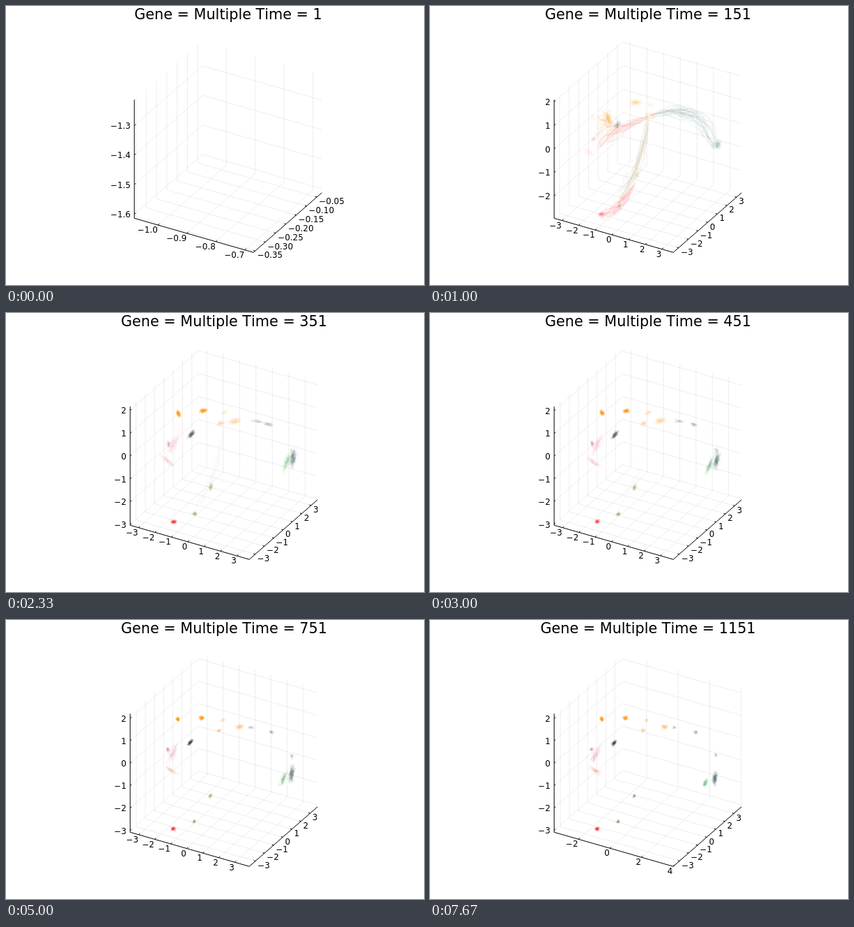
Write an HTML page with a canvas that moves like this. It is 600 by 400 pixels and loops after 8 s.

```html
<!DOCTYPE html>
<html lang="en">
<head>
<meta charset="utf-8">
<title>Gene trajectories</title>
<style>
  html, body { margin: 0; width: 100%; height: 100%; overflow: hidden; background: #fff; }
  svg, canvas { position: absolute; left: 0; top: 0; width: 600px; height: 400px; }
  text { font-family: "DejaVu Sans", sans-serif; font-size: 11.9px; font-kerning: none; fill: #000; }
  .title { font-size: 20.75px; text-anchor: middle; }
  .end { text-anchor: end; }
  .grid { stroke: #000; stroke-opacity: .07; fill: none; }
  .axis { stroke: #000; fill: none; }
</style>
</head>
<body>
<svg id="plot" viewBox="0 0 600 400"></svg>
<canvas id="cells" width="600" height="400"></canvas>
<script>
const LOOP = 8000, STEPS = 24;
const plot = document.getElementById('plot');
const ctx = document.getElementById('cells').getContext('2d');

const mix = (a, b, k) => a + (b - a) * k;
const decay = (step, start, tau) => Math.exp(-Math.max(0, step - start) / tau);

function rng(seed) {
  return () => {
    seed = seed + 0x6D2B79F5 | 0;
    let r = Math.imul(seed ^ seed >>> 15, 1 | seed);
    r = r + Math.imul(r ^ r >>> 7, 61 | r) ^ r;
    return ((r ^ r >>> 14) >>> 0) / 4294967296;
  };
}
const gauss = rnd => (rnd() + rnd() + rnd() - 1.5) * 2;

// ---------- axes ----------
// Screen vectors of the three box edges
const EX = [171, 49], EY = [98, -85.5], EZ = [0, -170];

// Axis ranges: one point at first, then the box widens as the cells spread
function ranges(step) {
  if (step === 0) return { x: [-1.082, -.67], y: [-.358, -.026], z: [-1.614, -1.2125] };
  const k = Math.exp((3 - step) / 5);
  return {
    x: [-3.54 + .07 * k, Math.min(4.02, 3.68 + .019 * (step - 3))],
    y: [-3.69 + .13 * k, 3.85 - .33 * k],
    z: [-3.09 + .14 * k, 2.22 - .13 * k]
  };
}

// Pairs of value and position along the axis
function ticks([lo, hi], unit) {
  const out = [];
  for (let i = Math.ceil(lo / unit); i * unit <= hi; i++) out.push([i * unit, (i * unit - lo) / (hi - lo)]);
  return out;
}

function drawAxes(step) {
  const first = step === 0, ox = first ? 184.2 : 178.2, oy = 304.3;
  const { x, y, z } = ranges(step);
  const at = (a, b, c) => [
    ox + a * EX[0] + b * EY[0] + c * EZ[0],
    oy + a * EX[1] + b * EY[1] + c * EZ[1]
  ];
  const path = (...pts) => 'M' + pts.map(p => p.map(n => n.toFixed(2)).join(' ')).join('L');
  let grid = '', texts = '';
  let axis = path(at(0, 0, 1), at(0, 0, 0), at(1, 0, 0), at(1, 1, 0));
  const put = (px, py, s, cls) => {
    texts += `<text x="${px.toFixed(2)}" y="${py.toFixed(2)}" class="${cls}">${s}</text>`;
  };
  const number = (v, digits) => (v < -1e-9 ? '\u2212' : '') + Math.abs(v).toFixed(first ? digits : 0);

  for (const [v, f] of ticks(x, first ? .1 : x[1] > 4 ? 2 : 1)) {
    const p = at(f, 0, 0);
    grid += path(p, at(f, 1, 0), at(f, 1, 1));
    axis += path(p, at(f, .02, 0));
    put(p[0] - .5, p[1] + 11.2, number(v, 1), 'end');
  }
  for (const [v, f] of ticks(y, first ? .05 : 1)) {
    const p = at(1, f, 0);
    grid += path(p, at(0, f, 0), at(0, f, 1));
    axis += path(p, at(.986, f, 0));
    put(p[0] + 3.2, p[1] + 10.2, number(v, 2), '');
  }
  for (const [v, f] of ticks(z, first ? .1 : 1)) {
    const p = at(0, 0, f);
    grid += path(p, at(0, 1, f), at(1, 1, f));
    axis += path(p, at(0, .02, f));
    put(ox - 5.4, p[1] + 4.8, number(v, 1), 'end');
  }
  put(ox + 134.8, 18.6, 'Gene = Multiple Time = ' + (1 + 50 * step), 'title');
  plot.innerHTML = `<path class="grid" d="${grid}"/><path class="axis" d="${axis}"/>` + texts;
}

// ---------- cells ----------
const items = [];

// Bundle of wandering strands along a curve; fades with time constant tau
function stream(color, n, width, tau, ...pts) {
  items.push((step, rnd) => {
    const life = decay(step, 3, tau), reach = Math.min(1, step * .45);
    if (life < .12) return;
    ctx.strokeStyle = color;
    ctx.globalAlpha = .15 * life;
    for (let i = 0; i < n; i++) {
      const from = rnd() * mix(.7, .3, life) * reach, to = reach * (1 - rnd() * .3);
      const count = Math.ceil((to - from) * 24) + 2;
      const side = [gauss(rnd), gauss(rnd)];
      ctx.beginPath();
      for (let j = 0; j <= count; j++) {
        const u = mix(from, to, j / count), [x, y] = along(pts, u);
        const w = width * mix(.5, 1, life) * (.25 + Math.sin(Math.PI * .85 * u ** 1.3));
        side.forEach((v, c) => { side[c] = v * .94 + gauss(rnd) * .3; });
        ctx.lineTo(x + side[0] * w, y + side[1] * w);
      }
      ctx.stroke();
    }
  });
}

// Scribbled swarm that drifts from a to b, drawn out on the way; long is its final length to width
function swarm(color, n, a, b, size, tau, long = 1.2) {
  const dx = b[0] - a[0], dy = b[1] - a[1], dist = Math.hypot(dx, dy);
  const c = dx / dist, s = dy / dist;
  items.push((step, rnd) => {
    if (step < 3) return;
    const k = decay(step, 2, tau);
    const x = mix(b[0], a[0], k), y = mix(b[1], a[1], k);
    const sx = size * long + dist * k * (1 - k) * .5, sy = size * (1 + .8 * k);
    ctx.strokeStyle = color;
    ctx.globalAlpha = .12 * (1 - .5 * k) * Math.min(1, (step - 1) / 4);
    for (let i = 0; i < n; i++) {
      ctx.beginPath();
      for (let j = 0; j < 8; j++) {
        const p = gauss(rnd) * sx, q = gauss(rnd) * sy;
        ctx.lineTo(x + p * c - q * s, y + p * s + q * c);
      }
      ctx.stroke();
    }
  });
}

// Point on a Catmull-Rom curve, u in 0..1
function along(pts, u) {
  const last = pts.length - 1, t = Math.min(u * last, last - 1e-6), i = Math.floor(t), k = t - i;
  const p = j => pts[Math.max(0, Math.min(last, j))];
  return [0, 1].map(c => {
    const a = p(i - 1)[c], b = p(i)[c], d = p(i + 1)[c], e = p(i + 2)[c];
    return b + .5 * k * (d - a + k * (2 * a - 5 * b + 4 * d - e + k * (3 * (b - d) + e - a)));
  });
}

const ORANGE = '#ff9d1c', PEACH = '#ffb568', GREY = '#8c9494', SLATE = '#6f8585';
const FORK = [314, 158];

stream('#b5a27c', 26, 4, 3, FORK, [298, 228], [267, 291]);
stream('#ff5a5a', 26, 4, 1.5, [296, 252], [272, 283], [243, 301]);
stream('#e2605a', 24, 4, 1.2, FORK, [275, 176], [237, 204]);
stream(SLATE, 30, 4.5, 1.8, FORK, [352, 151], [388, 163], [410, 205]);
stream('#eeb070', 22, 7, 2, [274, 178], [254, 168], [242, 160]);

swarm(ORANGE, 34, [303, 137], [280.5, 140.5], 1.6, 2.5);
swarm(ORANGE, 34, [262, 172], [246.5, 142], 1.5, 2);
swarm(PEACH, 18, [314, 159], [337, 153], 2, 5);
swarm(PEACH, 12, [312, 157], [305.5, 158.5], 1.6, 5);
swarm(PEACH, 7, [318, 141], [310.5, 144], 1.4, 6);
swarm(GREY, 12, [355, 152], [381.5, 161], 1.4, 3);
swarm(GREY, 7, [380, 158], [350, 154], 1.2, 5);
swarm('#4b6464', 26, [414, 196], [408, 233], 1.7, 12);
swarm('#4fa35c', 14, [411, 193], [394, 237], 1.6, 8);
swarm(GREY, 7, [413, 204], [410, 193], 1.3, 7);
swarm('#3c3c3c', 24, [270, 169], [264, 176.5], 1.4, 5, 1.9);
swarm('#e58ca8', 13, [243, 183], [237, 195], 2.3, 10, 3);
swarm('#ee8f86', 10, [228, 209], [239, 217], 1.6, 8, 3);
swarm('#c65c62', 9, [235, 192], [232, 185], 1.3, 6);
swarm('#a8956a', 15, [298, 240], [293, 252.5], 1.3, 4);
swarm('#8f8448', 13, [273, 286], [270, 289], 1.3, 4);
swarm('#f52b30', 24, [250, 298], [240, 299.5], 1.5, 2);

function drawCells(step) {
  ctx.clearRect(0, 0, 600, 400);
  ctx.lineWidth = .7;
  if (step) items.forEach((draw, i) => draw(step, rng(i * 977 + step * 31)));
}

// ---------- clock ----------
let shown = -1;
function tick() {
  const t = performance.now() % LOOP;
  const step = Math.min(STEPS - 1, Math.floor((t + 4) * STEPS / LOOP));
  if (step !== shown) {
    shown = step;
    drawAxes(step);
    drawCells(step);
  }
  requestAnimationFrame(tick);
}
tick();
</script>
</body>
</html>
```
